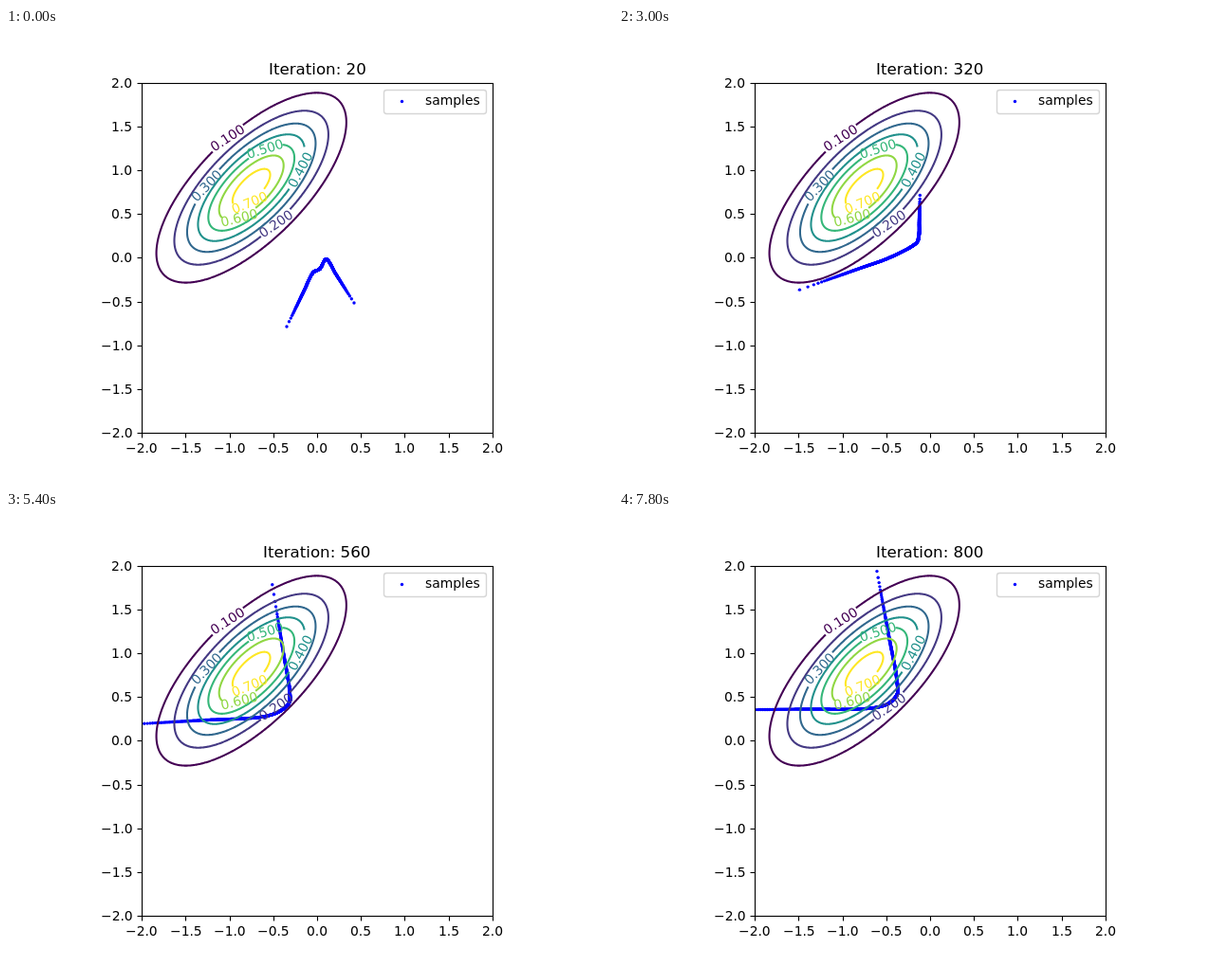
These frames come from a looping animation (640x480 px, 8000 ms). An HTML page with a canvas:

```html
<!DOCTYPE html>
<html lang="en">
<head>
<meta charset="utf-8">
<title>Samples</title>
<style>
  html, body { margin: 0; width: 100%; height: 100%; overflow: hidden; background: #fff; }
  canvas { display: block; }
</style>
</head>
<body>
<canvas id="plot" width="640" height="480"></canvas>
<script>
const ctx = document.getElementById('plot').getContext('2d');
const LOOP = 8000, STEP = 200, UNIT = 92.4, SAMPLES = 1000;
const BOX = { left: 143.5, top: 58.5, right: 513.5, bottom: 427.5 };
const toX = x => 328 + x * UNIT;
const toY = y => 242.4 - y * UNIT;
const mix = (a, b, k) => a + (b - a) * k;
const mixPoint = (p, q, k) => [mix(p[0], q[0], k), mix(p[1], q[1], k)];

// Gaussian density: mean (-0.75, 0.8), deviations 0.7 and 0.3 along the diagonals
const PEAK = 1 / (2 * Math.PI * 0.7 * 0.3);
// Labels are laid out as if the axes were not yet squeezed to a square
const LABEL_STRETCH = 496 / 369.6;
// Levels 0.1, 0.2, ... with the angle of each label on its ellipse
const CONTOURS = [
  { color: '#440154', angle: -1.42 },
  { color: '#443983', angle: 1.65 },
  { color: '#31688e', angle: -1.94 },
  { color: '#21918c', angle: 0.82 },
  { color: '#35b779', angle: -0.84 },
  { color: '#90d743', angle: 2.36 },
  { color: '#fde725', angle: 2.07 },
];

// Poses of the sample curve: right end, three points around the bend, left end
const POSES = [
  [[367, 290], [338, 244], [331, 254], [323, 259], [296, 315]],
  [[345, 230], [330, 230], [326, 239], [298, 260], [244, 309]],
  [[313, 168], [314, 217], [309, 227], [282, 240], [182, 271]],
  [[268, 42], [293, 178], [291, 197], [266, 208], [40, 211]],
];

function text(str, x, y, align = 'center', size = 13.89, color = '#000') {
  ctx.font = `${size}px "DejaVu Sans", sans-serif`;
  ctx.fillStyle = color;
  const shift = { left: 0, center: 0.5, right: 1 }[align];
  ctx.fillText(str, Math.round(x - shift * ctx.measureText(str).width), Math.round(y));
}

function line(points, color, width) {
  ctx.beginPath();
  points.forEach(([x, y]) => ctx.lineTo(x, y));
  ctx.strokeStyle = color;
  ctx.lineWidth = width;
  ctx.stroke();
}

function dot(x, y) {
  ctx.beginPath();
  ctx.arc(x, y, 1.7, 0, 2 * Math.PI);
  ctx.fill();
}

// Ellipse starting at its label, with a gap for the label and text along the chord
function drawContour({ color, angle }, index) {
  const level = (index + 1) / 10;
  const spread = UNIT * Math.sqrt(2 * Math.log(PEAK / level));
  const points = [];
  let length = 0;
  for (let i = 0; i <= 720; i++) {
    const t = angle + i * Math.PI / 360;
    const u = 0.7 * spread * Math.cos(t), v = 0.3 * spread * Math.sin(t);
    const x = toX(-0.75) + (u + v) * Math.SQRT1_2;
    const y = toY(0.8) - (u - v) * Math.SQRT1_2;
    if (i) {
      const last = points[i - 1];
      length += Math.hypot((x - last[0]) * LABEL_STRETCH, y - last[1]);
    }
    points.push([x, y, length]);
  }
  const half = 19.9, gap = half + 5;
  line(points.filter(p => p[2] >= gap && p[2] <= length - gap), color, 2.08);

  let from = points.find(p => p[2] >= length - half);
  let to = points.find(p => p[2] >= half);
  if (to[0] < from[0]) [from, to] = [to, from];
  ctx.save();
  ctx.translate(points[0][0], points[0][1]);
  ctx.rotate(Math.atan2(to[1] - from[1], (to[0] - from[0]) * LABEL_STRETCH));
  text(level.toFixed(3), 0, 5, 'center', 13.89, color);
  ctx.restore();
}

// Nine evenly weighted points: both straight arms are split into thirds
function curveAt(iteration) {
  const left = 1 - (iteration - 20) / 780;
  const phase = (POSES.length - 1) * (1 - left * left);
  const k = Math.min(POSES.length - 2, Math.floor(phase));
  const [start, a, b, c, end] = POSES[k].map((p, i) => mixPoint(p, POSES[k + 1][i], phase - k));
  return [start, mixPoint(start, a, 1 / 3), mixPoint(start, a, 2 / 3), a, b, c,
    mixPoint(c, end, 1 / 3), mixPoint(c, end, 2 / 3), end];
}

function catmullRom(a, b, c, d, t) {
  return b + t / 2 * (c - a + t * (2 * a - 5 * b + 4 * c - d + t * (3 * (b - c) + d - a)));
}

function drawSamples(iteration) {
  const curve = curveAt(iteration);
  const quantile = p => p ** 0.14 - (1 - p) ** 0.14; // close to the normal quantile
  const scale = 4 / quantile(1 - 0.5 / SAMPLES);
  const point = i => curve[Math.max(0, Math.min(8, i))];
  ctx.save();
  ctx.beginPath();
  ctx.rect(BOX.left, BOX.top, BOX.right - BOX.left, BOX.bottom - BOX.top);
  ctx.clip();
  ctx.fillStyle = '#00f';
  for (let i = 0; i < SAMPLES; i++) {
    const w = 4 + scale * quantile((i + 0.5) / SAMPLES);
    const s = Math.max(0, Math.min(7, Math.floor(w)));
    const [x, y] = [0, 1].map(j =>
      catmullRom(point(s - 1)[j], point(s)[j], point(s + 1)[j], point(s + 2)[j], w - s));
    dot(x, y);
  }
  ctx.restore();
}

function drawAxes() {
  ctx.strokeStyle = '#000';
  ctx.lineWidth = 1.11;
  ctx.strokeRect(BOX.left, BOX.top, BOX.right - BOX.left, BOX.bottom - BOX.top);
  for (let v = -2; v <= 2; v += 0.5) {
    const label = v.toFixed(1).replace('-', '\u2212');
    const x = Math.round(toX(v)) + 0.5, y = Math.round(toY(v)) + 0.5;
    line([[x, BOX.bottom], [x, BOX.bottom + 5]], '#000', 1.11);
    line([[BOX.left, y], [BOX.left - 5, y]], '#000', 1.11);
    text(label, toX(v), 448);
    text(label, 133.5, toY(v) + 5, 'right');
  }
}

function drawLegend() {
  ctx.beginPath();
  ctx.roundRect(398.5, 65.5, 108, 25, 2.8);
  ctx.fillStyle = 'rgba(255,255,255,.8)';
  ctx.fill();
  ctx.strokeStyle = 'rgba(204,204,204,.8)';
  ctx.lineWidth = 1.39;
  ctx.stroke();
  ctx.fillStyle = '#00f';
  dot(417.5, 77.5);
  text('samples', 442, 81, 'left');
}

function draw() {
  const now = performance.now();
  const iteration = 20 + 20 * Math.floor((now % LOOP) / STEP);
  ctx.fillStyle = '#fff';
  ctx.fillRect(0, 0, 640, 480);
  drawSamples(iteration);
  CONTOURS.forEach(drawContour);
  drawAxes();
  drawLegend();
  text(`Iteration: ${iteration}`, 328, 49, 'center', 16.67);
  requestAnimationFrame(draw);
}
draw();
</script>
</body>
</html>
```
